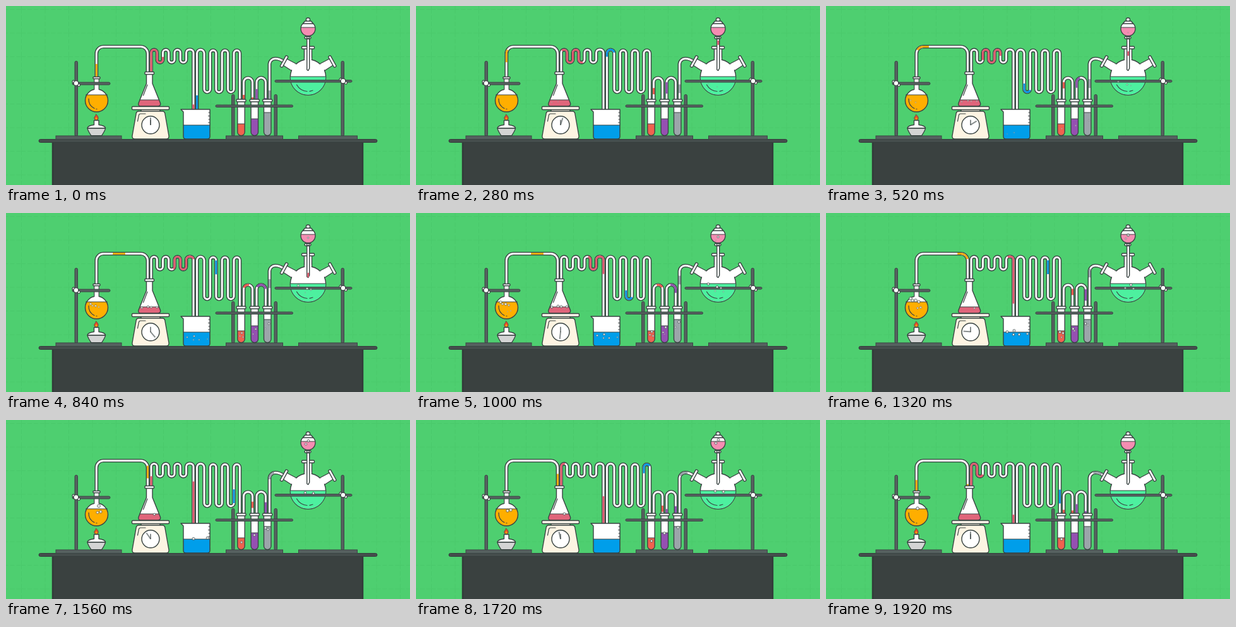
Animation, 640 px wide and 284 px high, one loop 1960 ms. Source, as an HTML page without scripts:

```html
<!DOCTYPE html>
<html lang="en">
<head>
<meta charset="utf-8">
<title>Chemistry bench</title>
<style>
  html, body { margin: 0; width: 100%; height: 100%; overflow: hidden; background: #4ecf70; }
  svg { display: block; width: 640px; height: 284px; }
  :root { --ink: #3a4443; --loop: 1960ms; }

  .o { stroke: var(--ink); stroke-width: 1.4; stroke-linejoin: round; }
  .line { fill: none; stroke: var(--ink); stroke-width: 1.2; stroke-linecap: round; }
  .metal { fill: #566160; stroke: var(--ink); stroke-width: 1; }
  .glass { fill: #fff; }

  .wall, .bore, .plug { fill: none; }
  .wall { stroke: var(--ink); stroke-width: 5.7; }
  .bore { stroke: #fff; stroke-width: 2.9; }
  .plug { stroke-width: 2.9; animation: flow var(--loop) linear infinite; }
  @keyframes flow {
    from { stroke-dashoffset: var(--a, 0px); }
    to { stroke-dashoffset: var(--z); }
  }

  .drop { animation: drip var(--loop) linear infinite; }
  @keyframes drip {
    0%, 7.4% { stroke-dashoffset: 7px; }
    48%, 100% { stroke-dashoffset: -50px; }
  }

  .hand { transform-origin: 229px 188.5px; animation: turn var(--loop) cubic-bezier(.37, 0, .63, 1) infinite; }
  @keyframes turn { to { transform: rotate(360deg); } }

  .flame { transform-origin: 143px 181px; animation: flicker 490ms ease-in-out infinite alternate; }
  @keyframes flicker { to { transform: scale(1.04, .95); } }

  .bubbles circle {
    r: 1.8px; fill: #fff; stroke: var(--ink); stroke-width: .8;
    transform-box: fill-box; transform-origin: center;
    animation: rise var(--loop) linear calc(var(--t) - var(--loop)) infinite;
  }
  .bubbles .big circle { r: 2.1px; }
  @keyframes rise {
    0% { transform: scale(.3); opacity: 1; }
    20% { transform: translateY(calc(var(--d) * -.4)) scale(.7); }
    35% { transform: translateY(calc(var(--d) * -.7)) scale(1); }
    49% { transform: translateY(calc(var(--d) * -1)) scale(1.1); opacity: 1; }
    50%, 100% { transform: translateY(calc(var(--d) * -1)) scale(1.1); opacity: 0; }
  }
</style>
</head>
<body>
<svg viewBox="0 0 640 284">
  <defs>
    <pattern id="grid" x="24" y="5" width="37.5" height="37.5" patternUnits="userSpaceOnUse">
      <path d="M.5 0V38M0 .5H38" fill="none" stroke="#49c86a" stroke-dasharray="7 3"/>
    </pattern>
    <path id="t1" pathLength="160" d="M143.3 113V75.500a11 11 0 0 1 11-11H213.500a11 11 0 0 1 11 11V104"/>
    <path id="t2" pathLength="290" d="M230 104V74a4.600 4.600 0 0 1 9.250 0v11a4.600 4.600 0 0 0 9.250 0v-11a4.600 4.600 0 0 1 9.250 0v11a4.600 4.600 0 0 0 9.250 0v-11a4.600 4.600 0 0 1 9.250 0v11a4.600 4.600 0 0 0 9.250 0v-11a5.750 5 0 0 1 11.500 0V164"/>
    <path id="t3" pathLength="610" d="M302.500 164V75a5.750 5.750 0 0 1 11.500 0v57a4.700 4.700 0 0 0 9.400 0v-57a4.700 4.700 0 0 1 9.400 0v57a4.700 4.700 0 0 0 9.400 0v-57a4.700 4.700 0 0 1 9.400 0v57a4.700 4.700 0 0 0 9.400 0v-57a4.700 4.700 0 0 1 9.400 0V148"/>
    <path id="t4" pathLength="76" d="M376.500 148V121a7 7 0 0 1 14 0V148"/>
    <path id="t5" pathLength="76" d="M397 148V121a7.200 7.200 0 0 1 14.400 0V148"/>
    <path id="t6" pathLength="85" d="M417.500 148V92a9 9 0 0 1 9-8.500q7 0 14 5"/>
    <g id="tubes">
      <use href="#t1"/><use href="#t2"/><use href="#t3"/><use href="#t4"/><use href="#t5"/><use href="#t6"/>
    </g>
    <path id="vial" d="M-5.700 150V200a5.700 5.700 0 0 0 11.400 0V150Z"/>
    <rect id="lip" class="o glass" x="-7.500" y="148" width="15" height="4" rx="1.500"/>
    <g id="clamp" stroke-linecap="round">
      <path d="M-4-2.500L4.500 3" stroke="#3a4443" stroke-width="5"/>
      <path d="M-4-2.500L4.500 3" stroke="#fff" stroke-width="2.800"/>
      <circle class="o glass" r="3.900"/>
    </g>
    <clipPath id="orb"><circle cx="143.500" cy="150" r="18"/></clipPath>
    <clipPath id="round"><circle cx="478.500" cy="113" r="27.800"/></clipPath>
    <clipPath id="bulb"><circle cx="478.500" cy="36" r="11.500"/></clipPath>
  </defs>

  <rect width="640" height="284" fill="#4ecf70"/>
  <rect width="640" height="284" fill="url(#grid)"/>

  <!-- bench -->
  <rect x="74" y="215" width="491" height="72" fill="#3a4140" stroke="#323a39" stroke-width="2.500"/>
  <rect x="52" y="211.500" width="536" height="5" rx="2.500" fill="#454e4d" stroke="#343d3c"/>
  <g class="metal">
    <rect x="109" y="87.500" width="4.500" height="119" rx="2"/>
    <rect x="531" y="87.500" width="4.500" height="119" rx="2"/>
    <rect x="357.500" y="140.500" width="4.500" height="66" rx="2"/>
    <rect x="425" y="140.500" width="4.500" height="66" rx="2"/>
    <rect x="79" y="206" width="104" height="5.500"/>
    <rect x="348.500" y="206" width="90" height="5.500"/>
    <rect x="463.500" y="206" width="93" height="5.500"/>
  </g>

  <!-- tubing -->
  <use href="#tubes" class="wall"/>
  <use href="#tubes" class="bore"/>
  <use href="#t1" class="plug" stroke="#f5ab0c" stroke-dasharray="20 140" style="--a:-1px;--z:-161px"/>
  <use href="#t2" class="plug" stroke="#e0596c" stroke-dasharray="82 208" style="--a:8px;--z:-282px"/>
  <use href="#t3" class="plug" stroke="#0c97e4" stroke-dasharray="22 700" style="--z:-584px"/>
  <use href="#t4" class="plug" stroke="#ee5a4c" stroke-dasharray="10 66" style="--a:3px;--z:-73px"/>
  <use href="#t5" class="plug" stroke="#8e4fae" stroke-dasharray="18 58" style="--a:2px;--z:-74px"/>
  <use href="#t6" class="plug" stroke="#98a2a8" stroke-dasharray="14 100" style="--z:-68px"/>

  <!-- heated flask and burner -->
  <circle cx="143.500" cy="150" r="18" class="glass"/>
  <path d="M120 141H165V170H120Z" fill="#ffae00" clip-path="url(#orb)"/>
  <path class="line" d="M126.500 141H160.500"/>
  <circle cx="143.500" cy="150" r="18" class="o" fill="none"/>
  <path class="glass" d="M139.800 115H147.200V135H139.800Z"/>
  <path class="line" d="M139.800 115V132.500M147.200 115V132.500"/>
  <rect class="o glass" x="138" y="112.500" width="11" height="3" rx="1"/>
  <path class="line" d="M131 147Q130.500 158 140 162.500M143 163.500H144"/>
  <rect class="metal" x="105" y="121" width="60" height="4" rx="2"/>
  <use href="#clamp" x="111" y="122.500"/>
  <g class="flame">
    <path d="M142.500 171.500Q146.800 175.500 146.200 178.500Q145.200 181 143 181Q140.500 181 139.800 178.500Q139.400 176.500 141 175Q142.300 173.500 142.500 171.500Z" fill="#e9472f" stroke="#5a4a35" stroke-width=".8"/>
    <path d="M143 176Q145 178 144.200 179.800Q143 181 141.800 179.800Q141.200 178.200 143 176Z" fill="#ffae00"/>
  </g>
  <path class="o glass" d="M139.500 181.500H147V188.500Q157.500 190 157.500 194H129Q129 190 139.500 188.500Z"/>
  <path class="o" fill="#d3d4d4" d="M129 194H157.500Q157 197.500 151.500 205.800H135Q129.500 197.500 129 194Z"/>

  <!-- scale with conical flask -->
  <rect class="o" x="214" y="163" width="30" height="5" fill="#fdf4e2"/>
  <path class="o" fill="#fdf4e2" d="M210 167H248Q251 167 251.700 170L258 206Q258.500 211 254 211H204Q199.500 211 200 206L206.300 170Q207 167 210 167Z"/>
  <rect class="o" x="199.500" y="159.500" width="59" height="5" rx="1.500" fill="#fdf8ec"/>
  <path class="line" d="M208.500 183L210.500 173Q211 171 213 171H221"/>
  <circle class="o glass" cx="229" cy="188.800" r="14"/>
  <path class="line" d="M229 188.500V181"/>
  <path class="line hand" d="M229 188.500V177.500"/>
  <path class="glass" d="M222.500 107H232V123L244.500 154Q245.500 158.500 241 159H213Q209 158.500 210 154L222.500 123Z"/>
  <path fill="#e0657b" d="M212 149H242.500L244.500 154Q245.500 158.500 241 159H213Q209 158.500 210 154Z"/>
  <path class="line" d="M212 149H242.500"/>
  <path class="o" fill="none" d="M222.500 107H232V123L244.500 154Q245.500 158.500 241 159H213Q209 158.500 210 154L222.500 123Z"/>
  <rect class="o glass" x="220" y="104.500" width="14.500" height="4" rx="1.200"/>
  <path class="line" d="M224 125L217.500 142"/>

  <!-- beaker -->
  <path class="glass" d="M277 164H323V207Q323 211 319 211H285Q281 211 281 207V168Z"/>
  <path fill="#009eea" d="M281 189H323V207Q323 211 319 211H285Q281 211 281 207Z"/>
  <path class="line" d="M281 189H323M323 169H321M323 174.500H320.500M323 180H321M323 185H320.500"/>
  <path class="o" fill="none" d="M277 164H323V207Q323 211 319 211H285Q281 211 281 207V168Z"/>

  <!-- test tubes -->
  <g transform="translate(372.500)">
    <use href="#vial" class="glass"/>
    <path fill="#f0624f" d="M-5.700 187H5.700V200a5.700 5.700 0 0 1-11.400 0Z"/>
    <path class="line" d="M-5 187H5"/>
    <use href="#vial" class="o" fill="none"/><use href="#lip"/>
  </g>
  <g transform="translate(393.800)">
    <use href="#vial" class="glass"/>
    <path fill="#9550b2" d="M-5.700 179H5.700V200a5.700 5.700 0 0 1-11.400 0Z"/>
    <path class="line" d="M-5 179H5"/>
    <use href="#vial" class="o" fill="none"/><use href="#lip"/>
  </g>
  <g transform="translate(414.200)">
    <use href="#vial" class="glass"/>
    <path fill="#9ca5aa" d="M-5.700 169H5.700V200a5.700 5.700 0 0 1-11.400 0Z"/>
    <path class="line" d="M-5 169H5"/>
    <use href="#vial" class="o" fill="none"/><use href="#lip"/>
  </g>
  <rect class="metal" x="332" y="157" width="122.500" height="3.500" rx="1.700"/>

  <!-- three-necked flask -->
  <g class="o glass">
    <path d="M472.500 67H484.500V92H472.500Z"/>
    <path d="M445 84L464 94L456 105L439 94Z"/>
    <path d="M512 84L493 94L501 105L518 94Z"/>
  </g>
  <circle class="o glass" cx="478.500" cy="113" r="28.200"/>
  <path class="glass" d="M473.200 82H483.800V92H473.200ZM444.500 84.700L464 95L457 104L440 93.500ZM512.500 84.700L493 95L500 104L517 93.500Z"/>
  <path fill="#4df09f" d="M450 112H507V143H450Z" clip-path="url(#round)"/>
  <path class="line" d="M451 112H506"/>
  <g class="o glass">
    <rect x="468.500" y="64" width="20" height="4" rx="1.500"/>
    <rect x="-2" y="-10" width="4.200" height="20" rx="1.500" transform="translate(440.500 88) rotate(29)"/>
    <rect x="-2.200" y="-10" width="4.200" height="20" rx="1.500" transform="translate(517 88) rotate(-29)"/>
  </g>
  <path class="line" d="M460.500 125Q466 134.500 477 135.500M481 135.300L486 134"/>
  <rect class="metal" x="426" y="117.500" width="122" height="3.500" rx="1.700"/>
  <use href="#clamp" x="534" y="119"/>

  <!-- dropping funnel -->
  <path class="o glass" d="M476.700 51H480.700V99L478.700 102.500L476.700 101Z"/>
  <path class="drop" d="M478.700 52V102" fill="none" stroke="#e0596c" stroke-width="2.500" stroke-dasharray="7 200"/>
  <circle cx="478.500" cy="36" r="11.500" class="glass"/>
  <path fill="#f48db2" d="M465 34H492V49H465Z" clip-path="url(#bulb)"/>
  <path class="line" d="M467.500 34H489.500"/>
  <circle cx="478.500" cy="36" r="11.500" class="o" fill="none"/>
  <g class="o glass">
    <circle cx="478.500" cy="21.800" r="3.100"/>
    <path d="M473.500 24H483.500L486.500 28H470.500Z"/>
    <rect x="473" y="48.500" width="10" height="3.500" rx="1.700"/>
    <circle cx="478.500" cy="50.200" r="1.800"/>
  </g>

  <!-- bubbles -->
  <g class="bubbles">
    <g class="big" style="--d:17px">
      <circle cx="134" cy="152" style="--t:390ms"/>
      <circle cx="142" cy="155" style="--t:400ms"/>
      <circle cx="137" cy="152" style="--t:560ms"/>
      <circle cx="147" cy="153" style="--t:620ms"/>
      <circle cx="150" cy="157" style="--t:900ms"/>
      <circle cx="145" cy="157" style="--t:970ms"/>
    </g>
    <g style="--d:5px">
      <circle cx="215" cy="153" style="--t:280ms"/>
      <circle cx="225" cy="152" style="--t:200ms"/>
      <circle cx="239" cy="152" style="--t:320ms"/>
      <circle cx="230" cy="152" style="--t:330ms"/>
      <circle cx="235" cy="153" style="--t:920ms"/>
    </g>
    <g style="--d:17px">
      <circle cx="298" cy="203" style="--t:400ms"/>
      <circle cx="287" cy="203" style="--t:500ms"/>
      <circle cx="297" cy="205" style="--t:620ms"/>
      <circle cx="306" cy="206" style="--t:560ms"/>
      <circle cx="319" cy="202" style="--t:720ms"/>
    </g>
    <g style="--d:13px">
      <circle cx="373.500" cy="197" style="--t:340ms"/>
      <circle cx="370.500" cy="199" style="--t:560ms"/>
      <circle cx="375.500" cy="201" style="--t:540ms"/>
      <circle cx="373" cy="202" style="--t:960ms"/>
    </g>
    <g style="--d:17px">
      <circle cx="395.500" cy="193" style="--t:330ms"/>
      <circle cx="391.500" cy="197" style="--t:560ms"/>
      <circle cx="393.500" cy="194" style="--t:900ms"/>
      <circle cx="416.500" cy="185" style="--t:300ms"/>
      <circle cx="411" cy="188" style="--t:600ms"/>
      <circle cx="415" cy="185" style="--t:900ms"/>
    </g>
    <g style="--d:15px">
      <circle cx="463" cy="124" style="--t:260ms"/>
      <circle cx="477" cy="129" style="--t:240ms"/>
      <circle cx="483" cy="127" style="--t:480ms"/>
      <circle cx="474" cy="127" style="--t:800ms"/>
      <circle cx="487" cy="127" style="--t:860ms"/>
    </g>
    <g style="--d:9px">
      <circle cx="478.500" cy="43" style="--t:440ms"/>
      <circle cx="475" cy="44" style="--t:940ms"/>
      <circle cx="479" cy="40" style="--t:800ms"/>
    </g>
  </g>
</svg>
</body>
</html>
```
